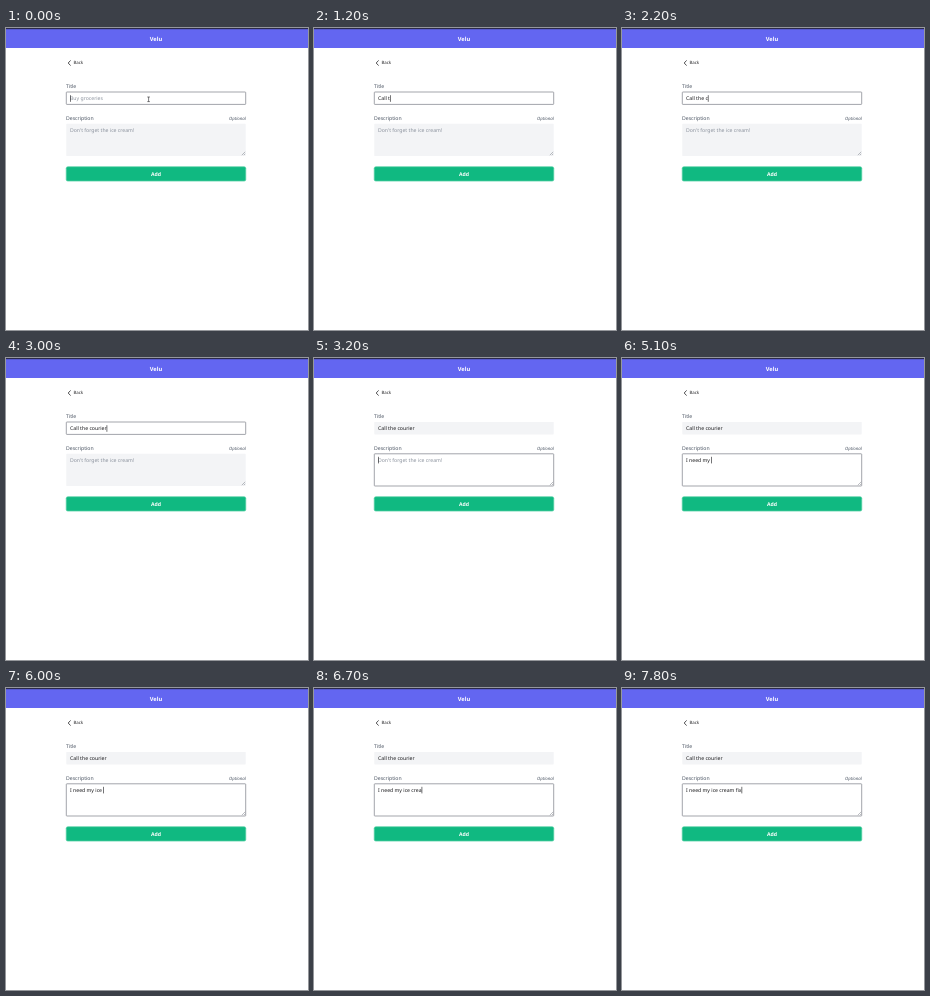
Animation of 302 by 302 pixels, one loop 8000 ms. Source, as an HTML page:

```html
<!DOCTYPE html>
<html lang="en">
<head>
<meta charset="utf-8">
<title>Add a task</title>
<style>
  html, body { margin: 0; height: 100%; overflow: hidden; background: #fff; }
  svg { display: block; width: 100%; height: 100%; }
  text {
    font: 5.15px "Noto Sans", "Open Sans", sans-serif;
    fill: #4b5563;
    white-space: pre;
    text-rendering: geometricPrecision;
  }
  text.small { font-size: 4.4px; }
  text.bold { font-weight: 700; fill: #fff; text-anchor: middle; }
  text.value { fill: #18181b; }
  text.value.empty { fill: #8b929d; }
  .box { fill: #f3f4f6; stroke: none; stroke-width: .7; }
  .box.focus { fill: #fff; stroke: #7b7f87; }
  .line { fill: none; stroke: #27272a; stroke-width: .6; }
</style>
</head>
<body>
<svg viewBox="0 0 302 302">
  <rect width="302" height="20" fill="#6366f1"/>
  <rect width="302" height="1.2" fill="#2b2a4c"/>
  <text class="bold" x="150" y="12.6" style="font-size:5.7px">Velu</text>

  <path class="line" d="M64.6 32.4L62.2 35L64.6 37.6" style="stroke-width:.8"/>
  <text class="small" x="67.4" y="36.4" style="fill:#27272a">Back</text>

  <text x="60" y="60.2">Title</text>
  <rect id="titleBox" class="box" x="60.3" y="64" width="179.4" height="12.4" rx=".6"/>
  <text id="title" class="value" x="64" y="71.8"></text>

  <text x="60" y="92">Description</text>
  <text class="small" x="240" y="91.7" text-anchor="end" font-style="italic" style="font-style:italic">Optional</text>
  <rect id="noteBox" class="box" x="60.3" y="95.8" width="179.4" height="32.2" rx=".6"/>
  <text id="note" class="value" x="64" y="103.6"></text>
  <path class="line" d="M235.8 127.2L239.2 123.8M237.8 127.2L239.2 125.8" style="stroke:#777b82;stroke-width:.5"/>

  <rect x="60.2" y="138.7" width="179.6" height="14.4" rx="1.6" fill="#10b981" stroke="#5fd3aa" stroke-width=".7"/>
  <text class="bold" x="150" y="147.6">Add</text>

  <path id="pointer" class="line" d="M141.3 69h2.6M142.6 69v4.6M141.3 73.6h2.6"/>
  <rect id="caret" width=".6" height="6.6" fill="#18181b"/>
</svg>
<script>
const LOOP = 8000, SWITCH = 3200;
const $ = id => document.getElementById(id);

// Each key time types one more character.
const fields = [
  { id: 'title', text: 'Call the courier', hint: 'Buy groceries', caretY: 67.2,
    keys: [400, 700, 800, 1000, 1100, 1200, 1300, 1900, 2000, 2200, 2300, 2500, 2700, 2800, 2900, 3000] },
  { id: 'note', text: 'I need my ice cream fix', hint: "Don't forget the ice cream!", caretY: 98.8,
    keys: [4000, 4100, 4200, 4300, 4400, 4500, 4600, 4800, 4900, 5100, 5300, 5500, 5700, 6000,
           6400, 6500, 6600, 6700, 6800, 6900, 7100, 7200, 7800] }
];
const caretOff = [[1500, 1700], [3800, 4000]];

function draw(t) {
  const active = fields[t < SWITCH ? 0 : 1];
  for (const f of fields) {
    const typed = f.text.slice(0, f.keys.filter(k => k <= t).length);
    const el = $(f.id);
    el.textContent = typed || f.hint;
    el.classList.toggle('empty', !typed);
    $(f.id + 'Box').classList.toggle('focus', f === active);
    if (f === active) {
      $('caret').setAttribute('x', 64 + (typed ? el.getComputedTextLength() : 0));
      $('caret').setAttribute('y', f.caretY);
    }
  }
  const hidden = caretOff.some(([from, to]) => t >= from && t < to);
  $('caret').style.visibility = hidden ? 'hidden' : 'visible';
  $('pointer').style.visibility = t < 500 ? 'visible' : 'hidden';
}

const start = performance.now();
function tick() {
  draw((performance.now() - start) % LOOP);
  requestAnimationFrame(tick);
}
tick();
</script>
</body>
</html>
```
